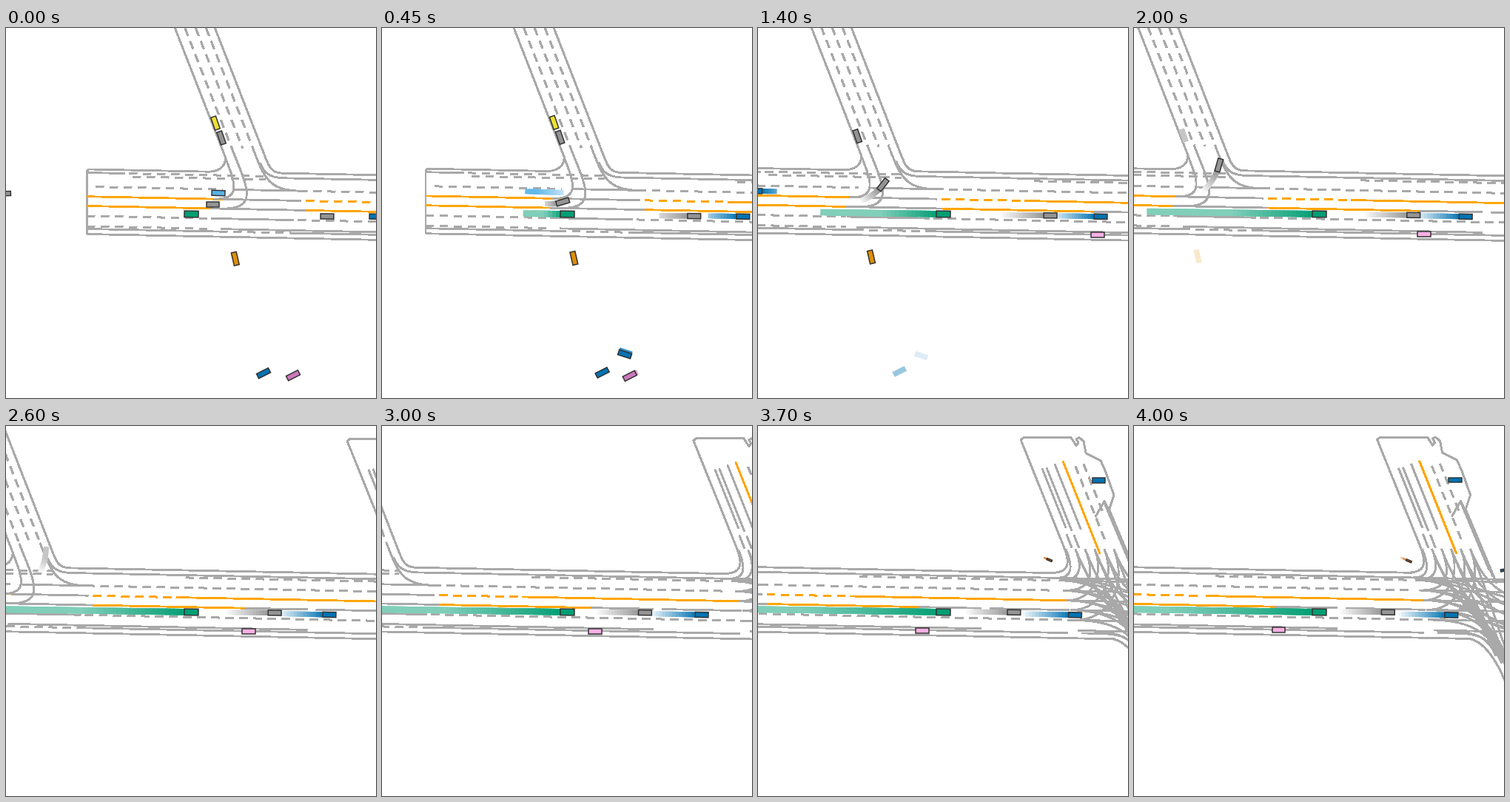
A matplotlib script for the animation above (4050 ms loop, 500 px wide and 500 px high).

```python
import numpy as np
import matplotlib.pyplot as plt
from matplotlib.animation import FuncAnimation
from matplotlib.collections import LineCollection, PolyCollection
from matplotlib.colors import to_rgb

FRAMES, STEP, SIZE = 81, 50, 500
PX = 0.72    # points per pixel at 100 dpi
FADE = 15    # frames a trail lasts
SLOPE = 0.02  # fall of the long road
LEFT = 109   # where the long road begins
LINE = 1.8

GREY, AMBER, DARK = "#a9a9a9", "#ffa500", "#333333"
BLUE, ORANGE, GREEN, RED = "#0173b2", "#de8f05", "#029e73", "#d55e00"
PINK, ROSE, STEEL, YELLOW, SKY = "#cc78bc", "#fbafe4", "#949494", "#ece133", "#56b4e9"

EAST, DOWN = np.array([1, SLOPE]), np.array([0.365, 0.93])
WEST, UP = -EAST, -DOWN

fig = plt.figure(figsize=(5, 5), dpi=100, facecolor="white")
ax = fig.add_axes([0, 0, 1, 1])
ax.axis("off")


def road(lines, color=GREY, dashed=False):
    style = (0, (10.5 / LINE, 8.3 / LINE)) if dashed else "solid"
    ax.add_collection(LineCollection(lines, colors=color, linewidths=LINE * PX,
                                     linestyles=[style], antialiaseds=False, zorder=1))


def on_lane(base, x):
    return np.array([x, base + SLOPE * (x - LEFT)])


def lane(base, x0, x1):
    return [on_lane(base, x0), on_lane(base, x1)]


def side(x, y0, y1, lean=0.39):
    return [(x, y0), (x + lean * (y1 - y0), y1)]


def bend(a, da, b, db, pull=0.45):
    """Cubic curve leaving a along da and reaching b along db."""
    a, b = np.array(a, float), np.array(b, float)
    reach = pull * np.hypot(*(b - a))
    c, d = a + reach * da, b - reach * db
    t = np.linspace(0, 1, 24)[:, None]
    return (1 - t) ** 3 * a + 3 * t * (1 - t) ** 2 * c + 3 * t * t * (1 - t) * d + t ** 3 * b


# Long road: each line is a height at its left end and the stretch it covers
TOP, SHOULDER, INNER, UPPER, MID1, MID2, LOWER, KERB1, KERB2, BOTTOM = LANES = (
    190.4, 197, 200.3, 213.9, 227.2, 240, 253.5, 267.5, 271, 278)

road([
    [(LEFT, BOTTOM), (LEFT, 193), (LEFT + 2, TOP)],
    lane(TOP, 111, 272), lane(TOP, 372, 795),
    lane(195, LEFT, 160), lane(SHOULDER, 372, 795),
    lane(UPPER, 308, 395), lane(MID1, 293, 398),
    lane(MID2, 275, 405), lane(MID2, 609, 694), lane(MID2, 706, 813),
    lane(LOWER, 277, 388), lane(KERB1, 290, 694),
    lane(KERB2, LEFT, 288), lane(KERB2, 392, 811), lane(BOTTOM, LEFT, 875),
])
road([
    lane(195, 166, 350), lane(199.3, 171, 350), lane(INNER, 530, 792),
    lane(UPPER, 121, 292), lane(UPPER, 396, 792),
    lane(LOWER, LEFT, 275), lane(LOWER, 394, 870),
    lane(KERB1, LEFT, 275), lane(KERB2, 288, 392),
], dashed=True)
road([lane(MID1, LEFT, 293), lane(MID1, 517, 811),
      lane(MID2, LEFT, 275), lane(MID2, 405, 609)], AMBER)
road([lane(MID1, 405, 512)], AMBER, dashed=True)

# Near side road
road([
    side(228, 0, 175), side(282, 0, 179),
    bend((296, 175), DOWN * (0, 1), on_lane(TOP, 272), WEST),
    bend((296, 175), DOWN, on_lane(MID1, 280), WEST, 0.65),
    bend((305, 163), DOWN, on_lane(MID2, 290), WEST, 0.65),
    bend((333, 162), DOWN, on_lane(UPPER, 397), EAST, 0.5),
    bend((343, 182), DOWN, on_lane(SHOULDER, 378), EAST),
    bend((352, 179), DOWN, on_lane(TOP, 374), EAST),
])
road([side(x, 0, 162) for x in (241.5, 256, 270)], dashed=True)

# Far side road
road([
    [(806, 168), (748, 24), (752, 21), (816, 21), (823, 32), (826, 28), (823, 23), (827, 21),
     (833, 26), (836, 42), (856, 52), (863, 68), (874, 99), (867, 120), (861, 107), (849, 128)],
    side(777, 63, 143, 0.4), side(783, 62, 147, 0.4), side(794, 57, 145, 0.4),
    side(810, 152, 170), side(820, 153, 170),
])
road([side(861 + 3 * i, 109 + 4 * i, 200 + 9 * i, 0.42) for i in range(3)])
road([side(822, 60, 163, 0.4), side(833, 57, 124, 0.4)], dashed=True)
road([side(805, 53, 178, 0.4)], AMBER)

# Far crossing: every arm's lanes joined to the other arms
north = [(809 + 13 * i, 172) for i in range(6)]
south = [(908 + 8 * i, 316 + 10 * i) for i in range(5)]
west = [on_lane(b, 790 + 5 * i) for i, b in enumerate(LANES)]
east = [on_lane(b, 985) for b in LANES]

links = [bend((806, 168), DOWN, on_lane(TOP, 786), WEST, 0.65)]
links += [bend(n, DOWN, w, WEST, 0.6) for n, w in zip(north[:3], west[1:4])]
links += [bend(n, DOWN, s, DOWN) for n, s in zip(north[1:], south)]
links += [bend(n, DOWN, e, EAST) for n, e in zip(north[1:], east[8:2:-1])]
links += [bend(w, EAST, e, EAST) for w, e in zip(west[1:], east[1:8])]
links += [bend(w, EAST, e, EAST) for w, e in zip(west[1:6], east[4:])]
links += [bend(w, EAST, s, DOWN) for w, s in zip(west[8:3:-1], south)]
links += [bend(w, EAST, n, UP) for w, n in zip(west[4:7], north[3:])]
links += [bend(s, UP, w, WEST) for s, w in zip(south, west[1:5])]
links += [bend(on_lane(BOTTOM, 870), EAST, (920, 349), DOWN, 0.3),
          bend(on_lane(KERB2, 842), EAST, (909, 316), DOWN)]
road(links)


def camera(f):
    x = 5.6 * f - 0.0145 * max(0, f - 36) ** 2  # cruise, then brake gently
    return np.array([x, 0.015 * x])


def box(centre, deg, length, width):
    a = np.radians(deg)
    corners = np.array([(-1, -1), (1, -1), (1, 1), (-1, 1)]) * (length / 2, width / 2)
    return corners @ np.array([(np.cos(a), np.sin(a)), (-np.sin(a), np.cos(a))]) + centre


def ego_box(f):
    return box(camera(f) + (250, 251), 0.8, 19, 8.6)


class Car:
    """Drives from (x, y) along its heading while seen, from first to last."""

    def __init__(self, color, first, last, x, y, deg, speed=0, accel=0, turn=0, size=(17.8, 7)):
        self.color, self.first, self.last, self.size = to_rgb(color), first, last, size
        age = np.arange(last - first + 1)
        self.deg = deg + turn * age
        mid = age[1:] - 0.5
        a, v = np.radians(deg + turn * mid), speed + accel * mid
        steps = np.column_stack([v * np.cos(a), v * np.sin(a)])
        self.path = np.vstack([[(x, y)], (x, y) + np.cumsum(steps, 0)])

    def box(self, f):
        i = f - self.first
        return box(self.path[i], self.deg[i], *self.size)


cars = [
    Car(STEEL, 0, 80, 433.5, 254, 0.6, speed=4.26, accel=-0.0036),
    Car(BLUE, 0, 80, 499.5, 254.3, 1.15, speed=4.24, accel=0.003),
    Car(STEEL, 0, 45, 279, 237.5, 0, speed=1.6, accel=0.023, turn=-1.85),
    Car(SKY, 0, 8, 286.5, 222.5, 182, speed=4.3),
    Car(BLUE, 23, 40, 173, 222.5, 181, speed=4),
    Car(YELLOW, 0, 11, 282.5, 128, 71),
    Car(STEEL, 0, 33, 290.5, 148, 71),
    Car(STEEL, 0, 10, -3, 223.3, -2, size=(17.8, 6)),
    Car(ORANGE, 0, 28, 309.3, 311.3, 77),
    Car(BLUE, 0, 19, 347.5, 466, -27),
    Car(PINK, 0, 11, 387.5, 469, 153, speed=0.35),
    Car(BLUE, 4, 15, 379, 438, 108, speed=0.65, size=(7, 17.8)),
    Car(ROSE, 18, 80, 615, 281.7, 0),
    Car(BLUE, 50, 80, 853.5, 78.8, 0, size=(17.5, 6.7)),
    Car(RED, 67, 80, 782, 184.4, 23, speed=0.75, size=(7, 2.2)),
    Car(BLUE, 76, 80, 917, 201, -10, size=(4, 3)),
]

shapes = PolyCollection([np.zeros((4, 2))], zorder=3, joinstyle="miter")
ax.add_collection(shapes)


def pale(color, a):
    return tuple(1 - a + a * c for c in color)


def draw(f):
    x, y = camera(f)
    ax.set_xlim(x - 0.5, x + SIZE - 0.5)
    ax.set_ylim(y + SIZE - 0.5, y - 0.5)
    items = []

    def add(pts, fill, solid=False):
        items.append((pts, fill, DARK if solid else "none", 1.5 * PX if solid else 0))

    green = to_rgb(GREEN)
    for i in range(f):
        add(ego_box(i), pale(green, max(0.5, i / f)))
    for car in cars:
        for i in range(max(car.first, f - FADE + 1), min(f - 1, car.last) + 1):
            add(car.box(i), pale(car.color, 1 - (f - i) / FADE))
    for car in cars:
        if car.first <= f <= car.last:
            add(car.box(f), car.color, True)
    add(ego_box(f), green, True)

    pts, fills, edges, widths = zip(*items)
    shapes.set_verts(pts)
    shapes.set_facecolor(fills)
    shapes.set_edgecolor(edges)
    shapes.set_linewidth(widths)
    return [shapes]


anim = FuncAnimation(fig, draw, frames=FRAMES, interval=STEP, repeat=True,
                     repeat_delay=0, blit=False)
plt.show()
```
